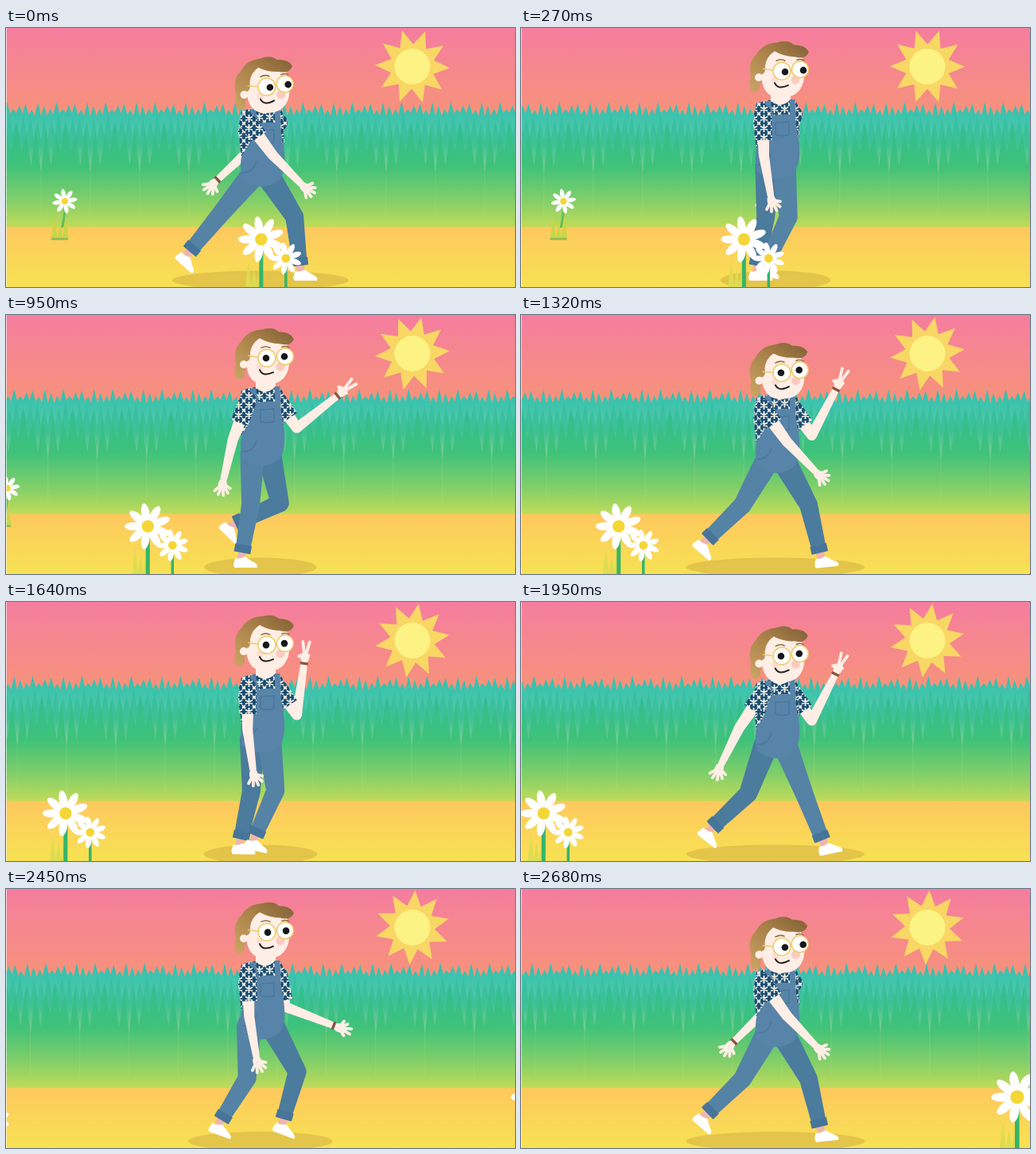
These frames come from a looping animation (640x326 px, 2720 ms). An HTML page:

```html
<!DOCTYPE html>
<html lang="en">
<head>
<meta charset="utf-8">
<title>Walk in the meadow</title>
<style>
html, body { margin: 0; width: 100%; height: 100%; overflow: hidden; background: #f57d9d; }
svg { display: block; width: 100vw; height: 100vh; }
</style>
</head>
<body>
<svg viewBox="0 0 640 326" preserveAspectRatio="none">
  <defs>
    <linearGradient id="sky" x2="0" y2="1"><stop stop-color="#f57d9f"/><stop offset="1" stop-color="#f79577"/></linearGradient>
    <linearGradient id="ground" x2="0" y2="1"><stop stop-color="#fec85e"/><stop offset="1" stop-color="#f7e253"/></linearGradient>
    <linearGradient id="back" gradientUnits="userSpaceOnUse" x1="0" y1="93" x2="0" y2="150"><stop stop-color="#2fc0b2"/><stop offset="1" stop-color="#5ccaa2"/></linearGradient>
    <linearGradient id="middle" gradientUnits="userSpaceOnUse" x1="0" y1="108" x2="0" y2="184"><stop stop-color="#33bfaa"/><stop offset=".5" stop-color="#3fc194"/><stop offset="1" stop-color="#86ce8c"/></linearGradient>
    <linearGradient id="front" gradientUnits="userSpaceOnUse" x1="0" y1="118" x2="0" y2="250"><stop stop-color="#2fbd93"/><stop offset=".42" stop-color="#3fc27a"/><stop offset=".75" stop-color="#82cf69"/><stop offset="1" stop-color="#bfdb5a"/></linearGradient>
    <linearGradient id="hair" x1="1" x2=".1" y2="1"><stop stop-color="#7f5f35"/><stop offset=".45" stop-color="#a88048"/><stop offset="1" stop-color="#c9a263"/></linearGradient>
    <pattern id="print" width="13" height="12" patternUnits="userSpaceOnUse">
      <path fill="#1b4a6e" d="M0 0h13v12H0z"/>
      <path stroke="#f4f7f3" stroke-width="1.800" d="M6.500 1v10M2 3.500l9 5M2 8.500l9-5M0 0l2 2M13 12l-2-2M13 0l-2 2M0 12l2-2"/>
      <circle cx="6.500" cy="6" r="1.100" fill="#e5d9a0"/>
    </pattern>
  </defs>

  <path fill="url(#sky)" d="M0 0h640v120H0z"/>
  <g id="sun">
    <path id="rays" fill="#f9d765"/>
    <circle r="22.500" fill="#fdf284"/>
  </g>
  <g id="trees"></g>
  <path fill="url(#ground)" d="M0 250.500h640V326H0z"/>
  <g id="farFlower"></g>
  <ellipse id="shadow" cx="320" cy="317.500" ry="12" fill="#c9a53f" fill-opacity=".45"/>

  <g id="farArm"></g>
  <g id="farLeg"></g>
  <g id="nearLeg"></g>

  <g id="torso">
    <path fill="#feeee5" d="M314 72h25v28q-13 9-25 0z"/>
    <path fill="url(#print)" d="M296 95Q305 91 314 91Q326 103 339 90Q346 91 348 97L350 136L346 142V152H296L292 120Z"/>
    <path fill="none" stroke="#5784a8" stroke-width="7" d="M310 92l5 24M341 90l1 24"/>
    <path fill="#5784a8" d="M312 112Q328 106 344 110L349 140Q353 168 344 181Q322 198 297 181Q293 160 297 149Q309 136 312 112Z"/>
    <path fill="none" stroke="#4a7499" stroke-width="1.200" d="M320 119l17-1v16q-9 3-17 0zM297 172Q310 173 315 158"/>
  </g>

  <g id="head">
    <path fill="#feeee5" d="M304 40Q296 88 327 87Q349 88 355 68Q360 45 350 32L310 27Z"/>
    <path fill="url(#hair)" d="M289 79Q286 70 289 62Q285 42 296 33Q304 19 322 18Q336 14 343 21Q358 21 362 30Q358 40 344 36Q331 36 319 29Q309 35 307 47Q308 57 303 58L302 66Q299 71 300 77Q295 83 289 79Z"/>
    <circle cx="299" cy="62" r="5" fill="#feeee5"/>
    <circle cx="345" cy="65" r="5.500" fill="#f9b3a6" fill-opacity=".6"/>
    <circle cx="319" cy="65" r="4" fill="#f9b3a6" fill-opacity=".3"/>
    <g fill="#fff" stroke="#efcb6c" stroke-width="1.500">
      <circle cx="328" cy="54" r="11"/><circle cx="351" cy="52" r="10.500"/>
      <path fill="none" d="M317 53L304 51M339 53h2"/>
    </g>
    <g id="pupils" fill="#17161b"><circle cx="327" cy="54" r="4.300"/><circle cx="350" cy="52" r="4.300"/></g>
    <path fill="none" stroke="#94703f" stroke-width="1.600" stroke-linecap="round" d="M321 41q6-3 11 0M347 40q5-2 9 1"/>
    <path fill="none" stroke="#26201f" stroke-width="2" stroke-linecap="round" d="M319 69Q323 78 336 72"/>
  </g>
  <g id="nearArm"></g>
  <g id="meadow"></g>
  <g id="meadowNext"></g>
  <path stroke="#fff" stroke-opacity=".6" d="M.5 0V326"/>
</svg>
<script>
const LOOP = 2720, STRIDE = LOOP / 2, TURN = 2 * Math.PI;
const SKIN = '#feeee5', CUFF = '#47759a';
const { sin, cos, max, min, hypot, atan2 } = Math;
const $ = id => document.getElementById(id);
const range = n => [...Array(n).keys()];
const mix = (a, b, k) => a + (b - a) * k;
const lerp = (p, q, k) => [mix(p[0], q[0], k), mix(p[1], q[1], k)];
const swing = ([x, y], angle, len) => [x + len * sin(angle), y + len * cos(angle)];
const move = (id, x, y, extra = '') => $(id).setAttribute('transform', `translate(${x} ${y})${extra}`);
// Half sine between two moments, zero elsewhere
const bump = (t, a, b) => t > a && t < b ? sin(Math.PI * (t - a) / (b - a)) : 0;
function smooth(t, a, b) {
  const u = max(0, min(1, (t - a) / (b - a)));
  return u * u * (3 - 2 * u);
}

const shape = (d, fill) => `<path fill="${fill}" d="${d}"/>`;
const line = (d, color, w) =>
  `<path fill="none" stroke="${color}" stroke-width="${w}" stroke-linecap="round" d="${d}"/>`;

function taper(a, b, wa, wb) {
  const dx = b[0] - a[0], dy = b[1] - a[1], l = hypot(dx, dy) || 1;
  const nx = -dy / l / 2, ny = dx / l / 2;
  const pt = (p, w) => `${p[0] + nx * w} ${p[1] + ny * w}`;
  return `M${pt(a, wa)}L${pt(b, wb)}L${pt(b, -wb)}L${pt(a, -wa)}Z`;
}
const ball = ([x, y], r) =>
  `M${x - r} ${y}a${r} ${r} 0 1 0 ${2 * r} 0a${r} ${r} 0 1 0 ${-2 * r} 0Z`;
const limb = (a, b, c, wa, wb, wc) => taper(a, b, wa, wb) + ball(b, wb / 2) + taper(b, c, wb, wc);

// Knee in front of the line from hip to ankle
function bend(hip, ankle, thigh, shin) {
  const dx = ankle[0] - hip[0], dy = ankle[1] - hip[1], d = hypot(dx, dy);
  if (d >= thigh + shin) return lerp(hip, ankle, thigh / (thigh + shin));
  const along = (thigh ** 2 - shin ** 2 + d * d) / (2 * d), out = Math.sqrt(thigh ** 2 - along ** 2);
  return [hip[0] + (dx * along + dy * out) / d, hip[1] + (dy * along - dx * out) / d];
}

// Phase 0 is the moment this leg is stretched out in front; kick and reach shape its forward swing
function leg(id, phase, hipY, { kick, reach, color }) {
  const p = phase % 1, a = p * TURN, pass = bump(p, .5, .82);
  const rise = 20 * bump(p, .2, .85) + kick * pass;
  const hip = [320 + 7 * cos(a) - 13 * sin(a), hipY];
  const ankle = [298 + 73 * cos(a) - 18 * sin(a) - 14 * sin(2 * a) + reach * pass, 308 - rise];
  const knee = bend(hip, ankle, 66, 71), len = hypot(ankle[0] - knee[0], ankle[1] - knee[1]);
  const end = lerp(knee, ankle, 1 - 9 / len), top = lerp(knee, ankle, 1 - 19 / len);
  const tilt = min(44, 2.100 * rise) - 14 * bump(p, .8, 1);
  $(id).innerHTML =
    line(`M${end}L${ankle}`, '#efb5ac', 10) +
    `<path transform="translate(${ankle}) rotate(${tilt})" fill="#fff" d="M-7-2Q-11 7-8 10H20Q23 6 14 2Q8-2 5-4Q-2 0-7-2Z"/>` +
    shape(ball(hip, 15) + limb(hip, knee, end, 31, 23, 18), color) +
    shape(taper(top, end, 21, 21), CUFF);
  return ankle[0];
}

function hand(elbow, wrist, peace) {
  const turn = atan2(wrist[1] - elbow[1], wrist[0] - elbow[0]) * 360 / TURN;
  const fingers = range(5).map(i => {
    const a = (26 - 19 * i) * TURN / 360, raised = i === 1 || i === 2;
    const l = mix(20 - abs2(i - 1.500), raised ? 26 : 10, peace);
    return `M5 0L${l * cos(a)} ${l * sin(a)}`;
  }).join('');
  return `<g transform="translate(${wrist}) rotate(${turn})"><ellipse cx="6" rx="8" ry="5.500" fill="${SKIN}"/>${line(fingers, SKIN, 3.800)}</g>`;
}
const abs2 = v => v * v;

// Angles are measured from straight down, forward positive
function arm(id, shoulder, upper, lower, lengths, peace, band) {
  const elbow = swing(shoulder, upper, lengths[0]), wrist = swing(elbow, lower, lengths[1]);
  const sleeve = swing(shoulder, upper, 7 + 26 * cos(upper) ** 2);
  $(id).innerHTML =
    shape(limb(shoulder, elbow, wrist, 17, 13, 8.500), SKIN) + hand(elbow, wrist, peace) +
    (band ? shape(taper(lerp(elbow, wrist, .95), wrist, 10, 10), '#8d5140') : '') +
    shape(ball(shoulder, 11) + taper(shoulder, sleeve, 22, 22), 'url(#print)');
}

function daisy(x, y, r, count = 9) {
  const petals = range(count).map(i =>
    `<ellipse cx="${r * .6}" rx="${r * .42}" ry="${r * .18}" transform="rotate(${i * 360 / count - 100})"/>`).join('');
  return `<g transform="translate(${x} ${y})" fill="#fff">${petals}<circle r="${r * .34}"/><circle r="${r * .27}" fill="#f5d637"/></g>`;
}
const blades = (x, y, h, fill) =>
  shape(range(3).map(i => `M${x + i * 7} ${y}l4 ${-h * (1 - i % 2 * .3)}l4 ${h * (1 - i % 2 * .3)}z`).join(''), fill);

// Repeating row of pointed trees; every tile starts with its deepest gap
function ridge(fill, count, tip, tipVary, gap, gapVary) {
  const tile = 62;
  let d = `M${-tile} 252`;
  for (let k = 0; k < 15 * count; k++) {
    const i = k % count, x = -tile + k * tile / count;
    d += `L${x} ${gap + gapVary * cos(i * TURN / count)}L${x + tile / count / 2} ${tip + tipVary * sin(i * 2.400)}`;
  }
  return shape(d + 'V252Z', `url(#${fill})`);
}

function buildScene() {
  $('rays').setAttribute('d', 'M' + range(20).map(i =>
    swing([0, 0], TURN / 4 - i * TURN / 20, i % 2 ? 28 : 47)).join('L') + 'Z');

  $('trees').innerHTML =
    ridge('back', 8, 98, 5, 109, 2) +
    ridge('middle', 7, 113, 5, 136, 4) +
    ridge('front', 5, 127, 8, 168, 15) +
    line(range(14).map(i => `M${i * 62} 183V236`).join(''), '#d3ee8c30', 1);

  $('farFlower').innerHTML =
    line('M0 220Q1 232-3 250', '#62bd5b', 3) + blades(-17, 267, 32, '#c9d648') +
    shape('M-17 264h21v3h-21z', '#93bf58') + daisy(0, 218, 15.500, 8);
  $('meadow').innerHTML = $('meadowNext').innerHTML =
    blades(-20, 327, 34, '#dedc50') +
    line('M0 0V62', '#35b56a', 5) + line('M31 24V62', '#35b56a', 3.500).replace('V62', 'V327') +
    line('M0 266V328', '#35b56a', 5) + daisy(0, 266, 28.500) + daisy(31, 290, 20);
  for (const id of ['meadow', 'meadowNext'])
    $(id).innerHTML = blades(-20, 327, 34, '#dedc50') +
      line('M0 266V328', '#35b56a', 5) + line('M31 290V328', '#35b56a', 3.500) +
      daisy(0, 266, 28.500) + daisy(31, 290, 20);
}

function draw(ms) {
  const t = ms % LOOP, s = t / 1000, p = t % STRIDE / STRIDE, a = p * TURN;
  const drop = 20 * cos(a) ** 4, sink = drop * .5;
  const wave = smooth(t, 560, 930) - smooth(t, 2250, 2700);

  move('sun', 511, 48.500, ` rotate(${2 - 6.400 * s})`);
  move('trees', -18 - 56 * s, 0);
  move('farFlower', 74 - 76 * s, 0);
  move('meadow', 321 - 150 * s, 0);
  move('meadowNext', 624 + 190 * (2.680 - s), -36, ' scale(1.120)');

  const farX = leg('farLeg', p, 172 + sink, { kick: 30, reach: -4, color: '#4b7b9d' });
  const nearX = leg('nearLeg', p + .5, 172 + sink, { kick: -8, reach: 24, color: '#5483a5' });
  $('shadow').setAttribute('rx', 66 + .310 * Math.abs(farX - nearX));
  move('torso', 0, sink);
  move('head', 0, drop, ` rotate(${-drop * .2} 328 56)`);
  move('pupils', 5 * (1 - wave), 1 - wave);

  const back = -.1 - .72 * cos(a), hello = 2.620 + .38 * cos(a - .206 * TURN);
  arm('farArm', [343, 109 + sink], mix(back, .6, wave), mix(back, hello, wave), [40, 67], wave ** 3, true);
  const near = -.02 + .63 * cos(a) + .1 * cos(2 * a);
  arm('nearArm', [304, 108 + sink], near - .07, near + .07, [52, 52], 0, false);
}

buildScene();
const start = performance.now();
function tick() {
  draw(performance.now() - start);
  requestAnimationFrame(tick);
}
tick();
</script>
</body>
</html>
```
